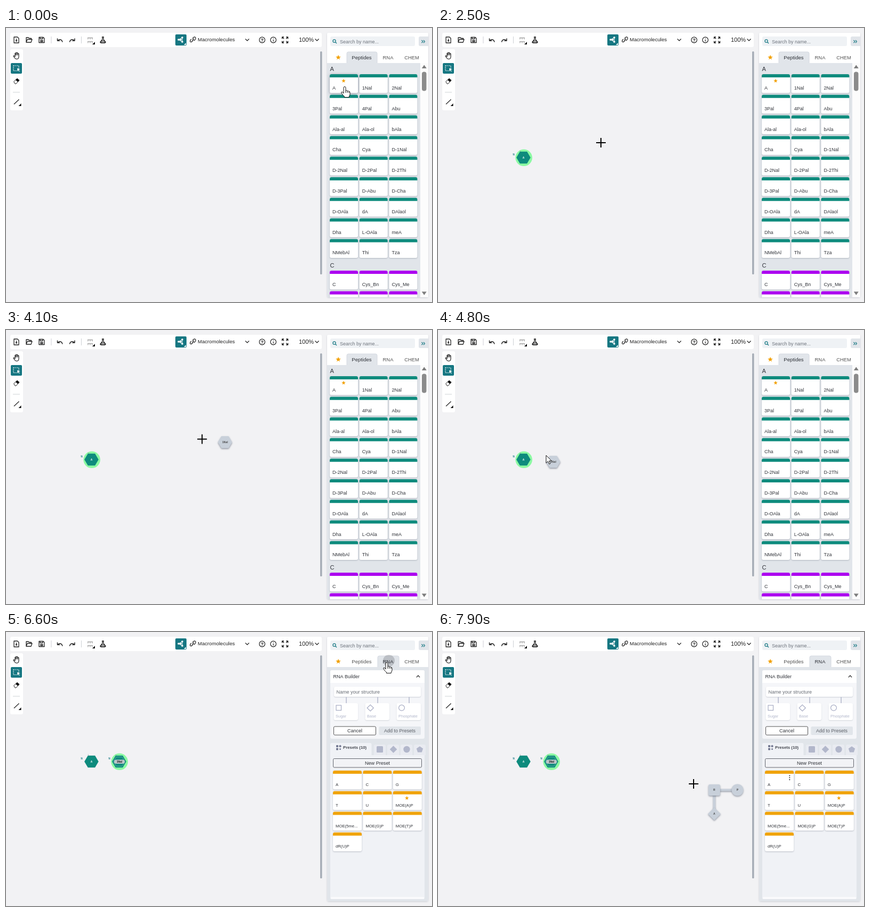
These frames come from a looping animation (800x516 px, 8000 ms). An HTML page with a canvas:

```html
<!DOCTYPE html>
<html lang="en">
<head>
<meta charset="utf-8">
<title>Macromolecule editor</title>
<style>
html, body { margin: 0; width: 100%; height: 100%; overflow: hidden; background: #f2f2f4; }
canvas { display: block; width: 800px; height: 516px; }
</style>
</head>
<body>
<canvas id="stage" width="800" height="516"></canvas>
<script>
const ctx = document.getElementById('stage').getContext('2d');
const LOOP = 8000, STEP = 100;
const FONT = '"Liberation Sans", Arial, sans-serif';
const TEAL = '#0e8b7d', BRAND = '#167782', INK = '#2f3238', PANEL = '#e1e5ea',
      GHOST = '#c8d0da', LILAC = '#b2b7cb', ORANGE = '#f0a30b', PURPLE = '#ac00f0';

const PEPTIDES = ['A', '1Nal', '2Nal', '3Pal', '4Pal', 'Abu', 'Ala-al', 'Ala-ol', 'bAla',
  'Cha', 'Cya', 'D-1Nal', 'D-2Nal', 'D-2Pal', 'D-2Thi', 'D-3Pal', 'D-Abu', 'D-Cha',
  'D-OAla', 'dA', 'DAlaol', 'Dha', 'L-OAla', 'meA', 'NMebAl', 'Thi', 'Tza'];
const PRESETS = ['A', 'C', 'G', 'T', 'U', 'MOE(A)P', 'MOE(5me...', 'MOE(G)P', 'MOE(T)P', 'dR(U)P'];

// Pointer waypoints: time, x, y
const ROUTE = [
  [0, 636, 111], [300, 636, 111], [700, 634, 114], [800, 634, 114], [900, 585, 135],
  [1000, 480, 160], [1100, 375, 177], [1200, 321, 197], [1400, 220, 226], [1700, 148, 236],
  [1900, 148, 236], [2200, 168, 233], [2500, 306, 216], [2600, 556, 164], [2700, 558, 163],
  [3100, 630, 134], [3400, 674, 111], [3700, 674, 112], [3800, 600, 140], [4000, 420, 195],
  [4400, 213, 237], [4800, 203, 236], [5400, 203, 236], [5600, 330, 290], [5800, 600, 370],
  [5900, 700, 345], [6000, 728, 240], [6200, 715, 58], [6700, 715, 58], [6900, 690, 170],
  [7100, 652, 278], [7400, 650, 283], [7500, 640, 338], [7600, 603, 372], [7700, 565, 330],
  [7800, 524, 285], [7900, 480, 286], [8000, 450, 288]
];

function pointer(t) {
  let i = 1;
  while (i < ROUTE.length - 1 && ROUTE[i][0] < t) i++;
  const [t0, x0, y0] = ROUTE[i - 1], [t1, x1, y1] = ROUTE[i];
  const k = Math.max(0, Math.min(1, (t - t0) / (t1 - t0)));
  return { x: x0 + (x1 - x0) * k, y: y0 + (y1 - y0) * k };
}

const within = (t, a, b) => t >= a && t < b;

function box(x, y, w, h, fill, r = 0, stroke) {
  ctx.beginPath();
  ctx.roundRect(x, y, w, h, r);
  if (fill) { ctx.fillStyle = fill; ctx.fill(); }
  if (stroke) { ctx.strokeStyle = stroke; ctx.lineWidth = 1; ctx.stroke(); }
}

function disc(x, y, r, fill, stroke, lw = 1) {
  ctx.beginPath();
  ctx.arc(x, y, r, 0, 7);
  if (fill) { ctx.fillStyle = fill; ctx.fill(); }
  if (stroke) { ctx.strokeStyle = stroke; ctx.lineWidth = lw; ctx.stroke(); }
}

function polygon(x, y, rx, ry, n, turn = 0) {
  ctx.beginPath();
  for (let i = 0; i < n; i++) {
    const a = turn + i * 2 * Math.PI / n;
    ctx.lineTo(x + rx * Math.cos(a), y + ry * Math.sin(a));
  }
  ctx.closePath();
}

function fillPolygon(color, ...shape) {
  polygon(...shape);
  ctx.fillStyle = color;
  ctx.fill();
}

function star(x, y, r, color) {
  ctx.beginPath();
  for (let i = 0; i < 10; i++) {
    const a = i * Math.PI / 5 - Math.PI / 2, d = i % 2 ? r * 0.42 : r;
    ctx.lineTo(x + d * Math.cos(a), y + d * Math.sin(a));
  }
  ctx.closePath();
  ctx.fillStyle = color;
  ctx.fill();
}

function label(s, x, y, size = 9, color = INK, align = 'left', weight = '') {
  ctx.font = `${weight} ${size}px ${FONT}`;
  ctx.textAlign = align;
  ctx.fillStyle = color;
  ctx.fillText(s, x, y);
}

function icon(x, y, d, { stroke = '#222', fill, lw = 1.3 } = {}) {
  const p = new Path2D(d);
  ctx.save();
  ctx.translate(x, y);
  ctx.lineJoin = 'round';
  if (fill) { ctx.fillStyle = fill; ctx.fill(p); }
  if (stroke) { ctx.strokeStyle = stroke; ctx.lineWidth = lw; ctx.stroke(p); }
  ctx.restore();
}

const solid = color => ({ stroke: null, fill: color });

function shadowed(blur, dy, alpha, draw) {
  ctx.save();
  ctx.shadowColor = `rgba(60,70,90,${alpha})`;
  ctx.shadowBlur = blur;
  ctx.shadowOffsetY = dy;
  draw();
  ctx.restore();
}

function topBar() {
  box(8, 9, 585, 27, '#fff', 3);
  icon(19.5, 22.5, 'M-4.5-5.5H2L4.5-3V5.5H-4.5ZM0-2.5V2.5M-1.5 1L0 2.5L1.5 1');
  icon(43, 22.5, 'M-5 4.5V-4.5H-1L.5-3H4.5V-1M-5 4.5L-3-1H6L4 4.5Z');
  icon(67, 22.5, 'M-5-5H3L5-3V5H-5ZM-3-4.5V-2H2V-4.5M-2 1H2V3H-2Z');
  icon(101, 22.5, 'M5 4C4-1 0-2-4 1M-4.5-3V1.5H0', { lw: 1.4 });
  icon(124.5, 22.5, 'M-5 4C-4-1 0-2 4 1M4.5-3V1.5H0', { lw: 1.4 });
  box(84.5, 16, 1, 13, '#cdd0d5');
  box(141, 16, 1, 13, '#cdd0d5');
  icon(158, 22.5, 'M-5-4H5M-5 3H5M-4-4V-1M0-4V-1M4-4V-1M-4 3V6M0 3V6M4 3V6', { stroke: '#aaa' });
  icon(167, 31, 'M0-5V0H-5Z', solid('#111'));
  icon(182, 22.5, 'M-2-5.5H2M-1-5V-1L-5 4Q-5 5.5-3.5 5.5H3.5Q5 5.5 5 4L1-1V-5M-3 2H3L4.5 5H-4.5Z');
  box(318, 12, 21, 21, BRAND, 2);
  icon(328, 22, 'M-4 0L3-4M-4 0L3 4M3-4V4M-4 0H2', { stroke: '#fff', lw: 1 });
  for (const [x, y] of [[324, 22], [331, 18], [331, 26], [328, 22]]) disc(x, y, 1.8, '#fff');
  icon(338, 32, 'M0-4V0H-4Z', solid('#fff'));
  icon(351, 22, 'M-1 1L2-2M-1-2L1-4Q3-6 5-4Q6-2 4 0L2 2M1 0L-1 3Q-3 5-5 4Q-6 2-4 0L-3-1', { lw: 1.2 });
  label('Macromolecules', 360, 25, 9.6, '#222');
  icon(453, 22, 'M-3.5-1.5L0 2L3.5-1.5', { lw: 1.2 });
  disc(481, 22.5, 5.3, null, '#222', 1.2);
  label('?', 481, 25.7, 9, '#222', 'center', 'bold');
  disc(502, 22.5, 5.3, null, '#222', 1.2);
  icon(502, 22.5, 'M0-.5V3M0-3V-1.8', { lw: 1.2 });
  icon(524, 22.5, 'M-2-5.5H-5.5V-2M2-5.5H5.5V-2M-2 5.5H-5.5V2M2 5.5H5.5V2M-5-5L-2-2M5-5L2-2M-5 5L-2 2M5 5L2 2');
  label('100%', 550, 26, 11, '#222');
  icon(584, 22, 'M-3.5-1.5L0 2L3.5-1.5', { lw: 1.2 });
}

function sideBar() {
  box(8, 40, 24, 115, '#fff', 3);
  icon(20, 52, 'M-3 2V-3.5Q-3-5-2-4.5V-1V-5Q-1-6.5 0-5V-1V-5Q1.5-6.5 2 -4.5V-1V-3.5Q3.5-5 4-3V2Q4 6.5 0 6.5Q-3 6.5-6 1Q-5.5-1-3 2Z', { fill: '#fff', lw: 1.2 });
  box(9, 66, 21, 20, BRAND, 2);
  ctx.save();
  ctx.setLineDash([2, 1.4]);
  ctx.strokeStyle = '#fff';
  ctx.lineWidth = 1.2;
  ctx.strokeRect(14, 71, 10, 9.5);
  ctx.restore();
  icon(21, 75, 'M0 0L6 3L3.5 4L5 7L3.5 7.5L2.5 5L0 7Z', { stroke: BRAND, fill: '#fff', lw: .6 });
  icon(20, 100, 'M-5.5 1L1-5L5-1.5L-1 5H-3Z', { lw: 1 });
  icon(20, 100, 'M-2-2L1-5L5-1.5L2 1.5Z', solid('#111'));
  box(13, 120.5, 13, 1, '#cdd0d5');
  icon(20, 139, 'M-5 4.5L4.5-4.5', { lw: 1.2 });
  icon(28.5, 147, 'M0-5V0H-5Z', solid('#111'));
  box(590, 44, 3.5, 420, '#a5acb6', 1.5);
}

function panelHead(rna, t) {
  box(603, 9, 190, 57, '#fff', 3);
  box(609, 16, 159, 18, '#eff2f5', 3);
  disc(616.5, 24.5, 2.6, null, BRAND, 1.2);
  icon(618.5, 26.5, 'M0 0L2.5 2.5', { stroke: BRAND });
  label('Search by name...', 627, 28.5, 9, '#6d737c');
  box(775, 16, 18, 18, PANEL, [3, 0, 0, 3]);
  icon(783.5, 25.5, 'M-3-2.5L-.5 0L-3 2.5M.5-2.5L3 0L.5 2.5', { stroke: BRAND, lw: 1.1 });
  const [tx, tw] = rna ? [698, 40] : [640, 57];
  box(tx, 45, tw, 22, PANEL, [3, 3, 0, 0], '#d5d9e1');
  if (within(t, 6500, 6900)) disc(719, 54, 11, 'rgba(90,92,100,.28)');
  star(624, 55.5, 5, '#f2a000');
  label('Peptides', 668, 58.8, 9.6, rna ? '#555' : INK, 'center');
  label('RNA', 717.5, 58.8, 9.4, rna ? INK : '#555', 'center');
  label('CHEM', 762, 58.8, 9.4, '#555', 'center');
}

function card(name, x, y, w, h, color, size, hover) {
  shadowed(hover ? 5 : 2.5, 1, hover ? .5 : .3, () => box(x, y, w, h, '#fff', 3));
  box(x, y, w, 6, color, [3, 3, 0, 0]);
  label(name, x + 5, y + 29, size);
}

function cardGrid(names, x0, y0, dx, w, h, color, size, cursor, extra) {
  names.forEach((name, i) => {
    const x = x0 + i % 3 * dx, y = y0 + Math.floor(i / 3) * 38.8;
    const hover = cursor && cursor.x > x && cursor.x < x + w && cursor.y > y && cursor.y < y + h;
    card(name, x, y, w, h, color, size, hover);
    if (extra) extra(i, x, y, hover);
  });
}

function peptidePanel(cursor) {
  box(603, 66, 175, 441, PANEL);
  box(778, 66, 15, 441, '#fcfcfc');
  box(781, 82.5, 8.5, 36, '#8b8b8b', 4);
  icon(785.3, 73, 'M-4.5 3L0-3.5L4.5 3Z', solid('#7d7d7d'));
  icon(785.3, 499.5, 'M-4.5-3L0 3.5L4.5-3Z', solid('#7d7d7d'));
  label('A', 608.5, 81, 11);
  cardGrid(PEPTIDES, 608, 87, 55.7, 53, 35.5, TEAL, 9, cursor, (i, x, y, hover) => {
    if (!i) return star(x + 26, y + 12.5, 4, '#f2a000');
    if (!hover) return;
    box(x + 4, y + 9.5, 8, 8, null, 2, '#ccc');
    icon(x + 8, y + 13.5, 'M-2 0H2M0-2V2', { stroke: '#ccc', lw: 1 });
    star(x + 25, y + 12.5, 4.3, '#d2d4d8');
  });
  label('C', 608.5, 451, 11);
  ctx.save();
  ctx.beginPath();
  ctx.rect(603, 440, 175, 67);
  ctx.clip();
  cardGrid(['C', 'Cys_Bn', 'Cys_Me', '', '', ''], 608, 457, 55.7, 53, 35.5, PURPLE, 9);
  ctx.restore();
}

function rnaPanel(cursor, t) {
  box(603, 66, 190, 441, PANEL, [0, 0, 3, 3]);
  box(609, 72, 177, 129, '#f5f6f9', 3);
  box(609, 72, 177, 24, '#fff', [3, 3, 0, 0]);
  label('RNA Builder', 614.5, 87, 9);
  icon(774, 83.5, 'M-3.2 1.8L0-1.5L3.2 1.8', { lw: 1.2 });
  shadowed(2, 1, .22, () => box(616, 103, 163, 19, '#fff', 3));
  label('Name your structure', 620.5, 116, 9, '#666b73');
  ['Sugar', 'Base', 'Phosphate'].forEach((name, i) => {
    const x = 615.5 + i * 59;
    box(x + 22.8, 122.5, 1.5, 11.5, LILAC);
    shadowed(2, 1, .18, () => box(x, 134, 45.5, 32, '#fff', 3));
    label(name, x + 3.5, 160.5, 7.5, LILAC);
  });
  ctx.strokeStyle = '#a6abc3';
  ctx.lineWidth = 1.2;
  ctx.strokeRect(620, 138, 9.5, 9.5);
  polygon(684.2, 143, 6, 6, 4);
  ctx.stroke();
  disc(743, 142.8, 5.4, null, '#a6abc3', 1.2);
  box(615.5, 178, 79, 16, '#fff', 2, '#555');
  label('Cancel', 655, 189, 9, INK, 'center');
  box(700.5, 178, 78.5, 16, PANEL, 2);
  label('Add to Presets', 739.5, 189, 9, '#5c6068', 'center');

  for (let i = 0; i < 4; i++) box(691 + i * 25, 212, 22, 20, '#e9ebf1', [3, 3, 0, 0]);
  box(609, 209, 77.5, 24, '#f0f2f6', [3, 3, 0, 0]);
  box(609, 232, 177, 271, '#f0f2f6', [0, 0, 3, 3]);
  box(609.5, 499, 176, 4, '#fafafc', 2);
  for (const [x, y] of [[620, 213], [620, 218.5]]) box(x, y, 4, 4, '#737891', 1);
  fillPolygon('#737891', 627.5, 215, 2.6, 2.6, 4);
  disc(627.5, 220.5, 1.5, '#737891');
  label('Presets (10)', 633, 220, 7.8, '#44474f', 'left', 'bold');
  box(696, 215, 12, 12, LILAC, 1.5);
  fillPolygon(LILAC, 727.5, 221, 6.8, 6.8, 4);
  disc(752.5, 221, 6.2, LILAC);
  fillPolygon(LILAC, 777, 221.5, 6.5, 6.3, 5, -Math.PI / 2);
  box(614.5, 238.5, 166, 16.5, '#f2f3f6', 2, '#62656d');
  label('New Preset', 697.5, 250, 9.1, INK, 'center');
  cardGrid(PRESETS, 614, 261, 56.4, 54, 35.5, ORANGE, 7.7, cursor, (i, x, y, hover) => {
    if (i === 5) star(x + 26, y + 13, 4, '#f2a000');
    if (hover || (!i && t >= 7000))
      for (let k = 0; k < 3; k++) disc(x + 46.3, y + 9.5 + k * 3.8, 1.05, '#333');
  });
}

function hexagon(x, y, color) {
  fillPolygon(color, x, y, 13.3, 13, 6);
}

function monomer(x, name, halo) {
  const y = 244;
  if (halo) disc(x + .7, y + .3, 15.8, '#8cfaa3');
  hexagon(x, y, TEAL);
  if (name === 'A') {
    label(name, x, y + 2, 5, '#fff', 'center', 'bold');
  } else {
    polygon(x, y, 11, 10, 6);
    ctx.strokeStyle = '#6fb6ae';
    ctx.lineWidth = .7;
    ctx.stroke();
    box(x - 9.5, y - 3.5, 20, 7.5, '#bcc5c9', 3.5);
    label(name, x + .5, y + 2.3, 4.8, '#111', 'center', 'bold');
  }
  label('N', x - 18.5, y - 3.7, 4.5, BRAND, 'center', 'bold');
  label('1', x - 6, y - 11.5, 4, '#8a8f96', 'center');
}

function ghostHexagon(x, y, name) {
  shadowed(3, 1.5, .55, () => hexagon(x, y, GHOST));
  label(name, x, y + 2, 5, '#444', 'center', 'bold');
}

function ghostNucleotide(x, y) {
  shadowed(3, 1.5, .5, () => {
    box(x, y - 2, 42, 4, GHOST);
    box(x - 1.5, y, 4, 42, GHOST);
  });
  shadowed(3, 1.5, .5, () => {
    box(x - 10.5, y - 10.5, 22, 21, GHOST, 3);
    disc(x + 44, y, 11, GHOST);
    fillPolygon(GHOST, x + .5, y + 45, 12, 12, 4);
  });
  label('R', x + .5, y + 2, 5, '#444', 'center', 'bold');
  label('P', x + 44, y + 2, 5, '#444', 'center', 'bold');
  label('A', x + .5, y + 47, 5, '#444', 'center', 'bold');
}

function drawCursor({ x, y }, t) {
  const resting = within(t, 1600, 2100) || within(t, 4400, 5500);
  if (x < 600 && !resting) {
    box(x - 9, y - 1, 18, 2, '#000');
    box(x - 1, y - 9, 2, 18, '#000');
  } else if (x < 604) {
    icon(x, y, 'M0 0V14.5L3.4 11.4L5.8 16.5L8 15.5L5.7 10.6H10.4Z', { stroke: '#111', fill: '#fff', lw: 1 });
  } else {
    icon(x, y, 'M-2 12V1.5Q-2-.5 0-.5Q2-.5 2 1.5V7Q4 5.6 5.2 7.6Q7.2 6.6 8 8.6Q10 8.2 10 10.6V14Q9.8 16 8.2 18V19.5H-.5V18Q-3 16-6 11.5Q-6.8 9.6-5 9.2Q-3.6 9.4-2 12ZM2 7V11M5.2 8V11M8 9V11',
      { stroke: '#111', fill: '#fff', lw: 1 });
  }
}

function render(t) {
  const cursor = pointer(t), trail = pointer(t - 60);
  const gx = trail.x + 12, gy = trail.y + 12;
  const rna = t >= 6500;
  ctx.fillStyle = '#f2f2f4';
  ctx.fillRect(0, 0, 800, 516);
  topBar();
  sideBar();
  shadowed(3, 1, .2, () => box(603, 9, 190, 498, '#fff', 3));
  panelHead(rna, t);
  if (rna) rnaPanel(cursor, t);
  else peptidePanel(cursor);

  if (t >= 1800) monomer(160.5, 'A', t < 5500);
  if (t >= 5000) monomer(212.5, '1Nal', true);
  if (within(t, 500, 1800)) ghostHexagon(gx, gy, 'A');
  if (within(t, 3700, 5000)) ghostHexagon(gx, gy, '1Nal');
  if (t >= 7400) ghostNucleotide(gx, gy);
  drawCursor(cursor, t);
}

let shown = -1;
function tick(now) {
  const t = Math.floor(now % LOOP / STEP) * STEP;
  if (t !== shown) render(shown = t);
  requestAnimationFrame(tick);
}
render(0);
requestAnimationFrame(tick);
</script>
</body>
</html>
```
